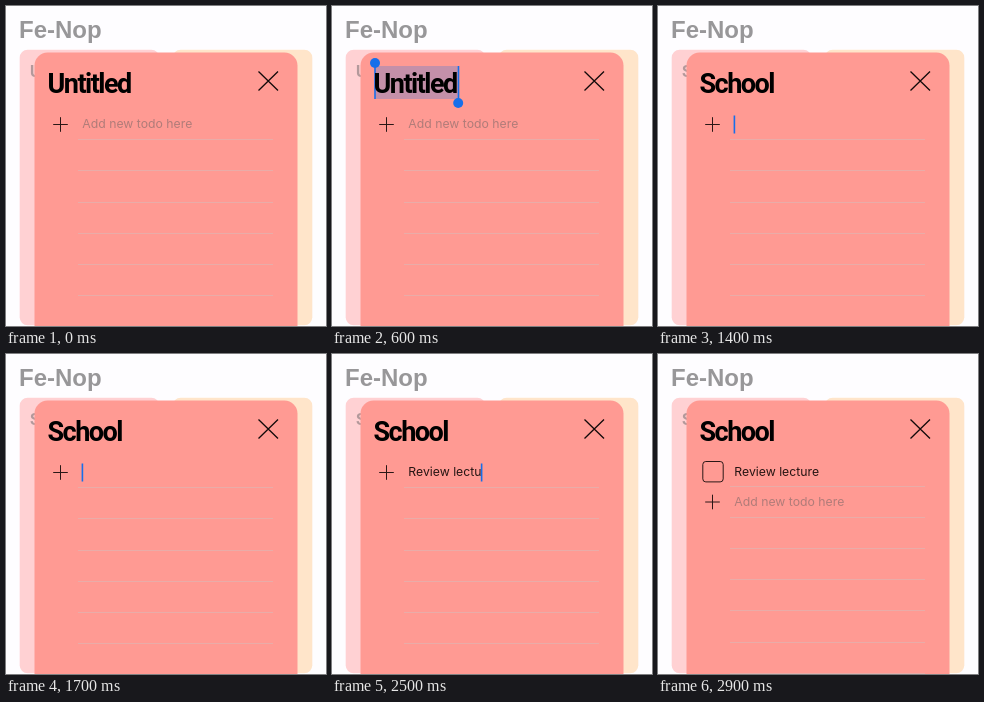
These frames come from a looping animation (320 px wide and 320 px high, 3 s). An HTML page:

```html
<!DOCTYPE html>
<html lang="en">
<head>
<meta charset="utf-8">
<style>
  html, body { margin: 0; height: 100%; overflow: hidden; background: #fefdff; }
  svg { display: block; width: 100vw; height: 100vh; }
  text { white-space: pre; }
  .brand { font: bold 24px "Liberation Sans", sans-serif; fill: #989799; }
  .behind { font: bold 16px Roboto, sans-serif; fill: #b3999b; }
  .title { font: bold 27px Roboto, sans-serif; letter-spacing: -1.5px; }
  .item { font: 12.25px Inter, sans-serif; fill: #261513; }
  .hint { font: 12.25px Inter, sans-serif; fill: #b17c79; }
  .icon { fill: none; stroke: #2a1716; stroke-width: 1; }
  .close { stroke: #120a0a; stroke-width: 1.3; }
  .rules { stroke: #e9aca8; stroke-width: 1; shape-rendering: crispEdges; }
  .blue { fill: #176fea; }
</style>
</head>
<body>
<svg viewBox="0 0 320 320">
  <text class="brand" x="13" y="32">Fe-Nop</text>
  <rect x="13.7" y="43.7" width="139.6" height="275.6" rx="8" fill="#ffd1d3"/>
  <rect x="166.7" y="43.7" width="139.6" height="275.6" rx="8" fill="#ffe5ca"/>
  <text class="behind" id="behind" x="24" y="71"></text>
  <rect x="28.5" y="46.6" width="263" height="300" rx="13" fill="#ff9a93"/>

  <g id="selection">
    <rect x="43" y="60" width="83.5" height="33" fill="#176fea" opacity=".25"/>
    <g class="blue">
      <rect x="42.2" y="57" width="1.6" height="36"/>
      <rect x="125.7" y="60" width="1.6" height="37"/>
      <circle cx="43" cy="57" r="5"/>
      <circle cx="126.2" cy="97" r="5"/>
    </g>
  </g>
  <text class="title" id="title" x="41.5" y="87"></text>
  <path class="icon close" d="M252.5 65.5l19.5 19M272 65.5l-19.5 19"/>

  <g class="rules" id="rules"></g>
  <rect class="icon" id="box" x="44.8" y="107.5" width="20.4" height="20.4" rx="3"/>
  <text class="item" id="item" x="76.3" y="122"></text>
  <g id="entry">
    <path class="icon" d="M47.2 118.5h14.6M54.5 111.2v14.6"/>
    <text class="hint" id="hint" x="76.3" y="122">Add new todo here</text>
  </g>
  <rect class="blue" id="caret" width="1.6"/>
</svg>
<script>
const LOOP = 3000, STEP = 100;
const $ = id => document.getElementById(id);
const show = (id, on) => $(id).setAttribute('display', on ? 'inline' : 'none');

for (let i = 0; i < 7; i++) {
  $('rules').innerHTML += `<path d="M72 ${133.6 + i * 31.2}H267"/>`;
}

// Part of the text typed by time t
const typed = (text, t, start, perLetter) =>
  text.slice(0, Math.max(0, Math.floor((t - start) / perLetter)));

function placeCaret(text, y, height) {
  const x = +text.getAttribute('x') + text.getComputedTextLength() - 0.7;
  $('caret').setAttribute('x', x);
  $('caret').setAttribute('y', y);
  $('caret').setAttribute('height', height);
}

function draw(now) {
  const t = Math.floor(now % LOOP / STEP) * STEP;
  const naming = t >= 700 && t < 1300;
  const writing = t >= 1400 && t < 2800;
  const added = t >= 2800;

  $('title').textContent = t < 700 ? 'Untitled' : typed('School', t, 600, 100);
  $('behind').textContent = t < 1300 ? 'Untitled' : 'School';
  $('item').textContent = typed('Review lecture', t, 1643, 70.4);

  show('selection', t >= 200 && t < 700);
  show('hint', !writing);
  show('box', added);
  show('caret', naming || writing);
  $('entry').setAttribute('transform', `translate(0 ${added ? 29.5 : 0})`);
  $('rules').setAttribute('transform', `translate(0 ${added ? -1.6 : 0})`);

  if (naming) placeCaret($('title'), 61, 32);
  if (writing) placeCaret($('item'), 109.5, 18);
}

function frame() {
  draw(performance.now());
  requestAnimationFrame(frame);
}
frame();
</script>
</body>
</html>
```
